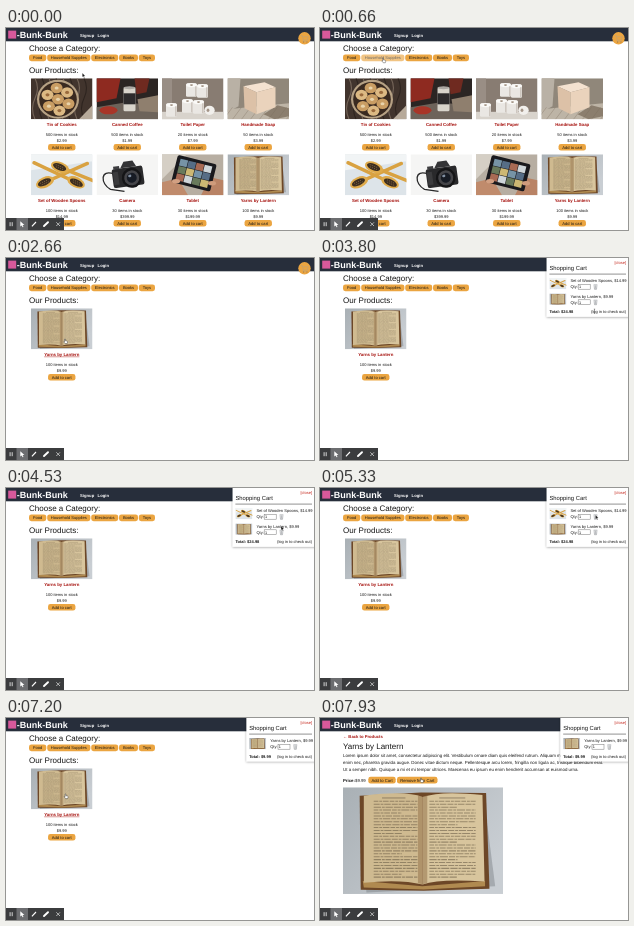
An HTML page that plays this animation: 308x202 px, repeating every 8 s.

```html
<!DOCTYPE html>
<html lang="en">
<head>
<meta charset="utf-8">
<title>Shop demo</title>
<style>
html, body { margin: 0; width: 100%; height: 100%; overflow: hidden; background: #fff; }
body > svg { display: block; width: 100vw; height: 100vh; }
text { font-family: "Liberation Sans", Arial, sans-serif; text-rendering: geometricPrecision; white-space: pre; }
</style>
</head>
<body>
<svg id="stage" viewBox="0 0 308 202"></svg>
<script>
const ORANGE = '#eba541', RED = '#a5100c', INK = '#161616';
const LOOP = 8000, W = 61.5, H = 41;
const BOOK_TITLE = 'Yarns by Lantern';

const rect = (x, y, w, h, fill, extra = '') =>
  `<rect x="${x}" y="${y}" width="${w}" height="${h}" fill="${fill}" ${extra}/>`;
const oval = (x, y, rx, ry, fill, extra = '') =>
  `<ellipse cx="${x}" cy="${y}" rx="${rx}" ry="${ry}" fill="${fill}" ${extra}/>`;
const shape = (d, fill, extra = '') => `<path d="${d}" fill="${fill}" ${extra}/>`;
const line = (d, color, width, extra = '') => shape(d, 'none', `stroke="${color}" stroke-width="${width}" ${extra}`);
const text = (x, y, size, str, { fill = INK, bold, anchor = 'start', extra = '' } = {}) =>
  `<text x="${x}" y="${y}" font-size="${size}" fill="${fill}" text-anchor="${anchor}" ${bold ? 'font-weight="700"' : ''} ${extra}>${str}</text>`;
const group = (id, content) => `<g id="${id}">${content}</g>`;
const turned = (x, y, angle, content) => `<g transform="translate(${x} ${y}) rotate(${angle})">${content}</g>`;
const button = (x, y, w, h, label, size = 4.05) =>
  rect(x, y, w, h, ORANGE, 'rx="2.4"') + text(x + w / 2, y + h / 2 + 1.4, size, label, { anchor: 'middle' });

// Pictures share a 61.5 x 41 drawing area.
function cookies() {
  let s = rect(0, 0, W, H, '#41342d');
  for (let i = 0; i < 9; i++) s += line(`M${i * 7 - 3} 0q5 10 0 20t0 21`, i % 2 ? '#8a7a6c' : '#261d19', 1.1, 'opacity=".7"');
  s += shape('M48 41L61.5 27V41Z', '#b7aa9a') + oval(27, 21, 21, 19.5, '#b6a184') + oval(27, 21, 18.8, 17.4, '#3a2a20');
  for (let i = 0; i < 7; i++) {
    const a = i * Math.PI / 3 + .4, r = i < 6 ? 11.4 : 0;
    const x = 27 + r * Math.cos(a), y = 21 + r * Math.sin(a);
    s += oval(x, y, 6, 5.2, i % 2 ? '#dcb983' : '#c99d63') + oval(x, y, 2, 1.6, i % 2 ? '#9a6a3d' : '#e8d3ab');
  }
  return s;
}

function coffee() {
  return rect(0, 0, W, H, '#2b2523') + shape('M0 0H24L20 20 0 24Z', '#8e2a20') + shape('M38 0H53L50 14 40 16Z', '#6f2a20') +
    shape('M0 29L30 24 61.5 28V41H0Z', '#6d635a') + shape('M41 21L61.5 17V34L43 33Z', '#8f7f6e') + rect(27, 9, 12, 24, '#d8d4cb', 'rx="1.5"') +
    rect(27, 15, 12, 11, '#2d2b2c') + oval(33, 9.5, 6, 1.5, '#aaa7a2') + oval(12, 32, 9, 4, '#a83528');
}

function toiletPaper() {
  const roll = (x, y) => rect(x, y, 11, 13.5, '#eae7e3', 'rx="1.5"') + oval(x + 5.5, y + 1.8, 5.4, 2.1, '#faf9f7') +
    oval(x + 5.5, y + 1.8, 1.6, .8, '#9d8d7e') + rect(x + 9, y + 3, 1.6, 10, '#cdc6bf');
  return rect(0, 0, W, H, '#887c72') + rect(0, 0, 10, 34, '#998e85') + rect(0, 33.5, W, 7.5, '#d8d3cc') +
    roll(24, 5) + roll(35, 6) + roll(20, 21) + roll(31, 22) + roll(4, 25) + oval(47.5, 32, 5.2, 4.6, '#f1efec') +
    oval(46, 32, 1.4, 1.7, '#a49588');
}

function soap() {
  let s = rect(0, 0, W, H, '#90877a') + shape('M0 0H13L11 28 0 34Z', '#b9b1a5') + shape('M0 31L61.5 25V41H0Z', '#bdb4a6');
  for (let i = 0; i < 8; i++) s += line(`M${i * 9 - 4} 41l9 -12`, '#8d8172', .8, 'opacity=".6"');
  return s + shape('M36 36L50 27 61.5 30V38L47 41Z', '#776857', 'opacity=".7"') + shape('M16 8L37 4 48 9 29 14Z', '#f4e2d0') +
    shape('M16 8L29 14V36L17 30Z', '#dcc1a7') + shape('M29 14L48 9V29L29 36Z', '#ead3bc');
}

function spoons() {
  const spoon = (x, y, angle) => turned(x, y, angle, rect(0, -1.7, 48, 3.4, '#d9a241', 'rx="1.5"') +
    oval(0, 0, 9.5, 5.3, '#dfab4b') + oval(-.5, -.2, 7, 3.2, '#3c2e20') +
    line('M-5 -1h9M-4 1h8', '#8a6b45', .8, 'stroke-dasharray="1 1.2"'));
  return rect(0, 0, W, H, '#dde4e9') + shape('M0 0H61.5V7L0 16Z', '#f1f4f5') + spoon(45, 28, 205) + spoon(14, 28, -24) +
    spoon(29, 13, 22);
}

function camera() {
  return rect(0, 0, W, H, '#f5f5f4') + line('M18 20C3 14 4 30 14 35T28 37', '#29292a', 1.3) +
    turned(32, 22, -8, rect(-16, -9, 31, 19, '#29292b', 'rx="2.5"') + shape('M-7 -9L-3 -15H6L9 -9Z', '#343436') +
      rect(-14, -11.5, 6, 3, '#3e3e40') + rect(-15, -6, 5, 13, '#3b3b3d') + oval(3, 2, 10, 10, '#151517') +
      oval(3, 2, 7.5, 7.5, '#454549') + oval(3, 2, 5, 5, '#171b24') + oval(1.3, -.2, 1.6, 1.3, '#8290a2'));
}

function tablet() {
  const tones = ['#7693a6', '#cdb873', '#697a5c', '#ced5d9', '#a86a54', '#566d86'];
  let screen = rect(-20, -14, 40, 28, '#19191d', 'rx="2"');
  for (let i = 0; i < 12; i++)
    screen += rect(-16.5 + i % 4 * 8.3, -11 + Math.floor(i / 4) * 7.5, 7.8, 7, tones[i * 5 % 6]);
  return rect(0, 0, W, H, '#b7aea2') + shape('M0 0H25L0 25Z', '#d5cfc5') + shape('M0 41V28L16 24 26 41Z', '#c08b6c') +
    shape('M61.5 41V26L48 23 39 41Z', '#b98365') + turned(32, 19, 14, screen) + oval(14, 27, 4, 2.2, '#d2a082') + oval(50, 29, 4, 2.2, '#cf9c7c');
}

function book() {
  let s = rect(0, 0, W, H, 'url(#wall)') + shape('M6.5 5L54 3 58.5 38 9 40.4Z', '#6f7478', 'opacity=".4"') +
    shape('M6.4 3.2L30 2 55 2.2 56.3 39 31 39.8 6.8 39.4Z', '#6d4727') + shape('M7.6 36L30.5 38 54.6 36V38L31 39.3 8 38.5Z', '#b08a50') +
    shape('M8 3.2Q24 1.2 30.6 3.7V37.4Q22 35.2 8 36.7Z', '#cfba90') + shape('M30.6 3.7Q38 1.2 53.6 3L54.4 36.2Q37 35 30.6 37.4Z', '#d8c59d') +
    shape('M28.8 3.1L30.6 3.7 32.4 3V36.7L30.6 37.4 28.8 36.8Z', '#8f6f46', 'opacity=".5"');
  for (let i = 0; i < 27; i++) {
    const y = 5.4 + i * 1.12, ends = i % 7 === 4 ? 6 : 0;
    const words = `stroke-dasharray="${1.8 + i % 3 * .5} .35 1.1 .3 ${2.2 + i % 4 * .3} .4" opacity=".6"`;
    s += line(`M11.8 ${y}H${28.6 - ends}M33.2 ${y}H${51 - (i % 6 === 2 ? 7 : 0)}`, '#6d5f49', .4, words);
  }
  return s + line('M15 4.1H24M37 4.1H47', '#6d5f49', .35, 'opacity=".7"');
}

const art = { cookies, coffee, toiletPaper, soap, spoons, camera, tablet, book };
const picture = (name, x, y, w) =>
  `<svg x="${x}" y="${y}" width="${w}" height="${w * H / W}" viewBox="0 0 ${W} ${H}">${art[name]()}</svg>`;

const products = [
  ['cookies', 'Tin of Cookies', 500, '2.99'], ['coffee', 'Canned Coffee', 500, '1.99'],
  ['toiletPaper', 'Toilet Paper', 20, '7.99'], ['soap', 'Handmade Soap', 50, '3.99'],
  ['spoons', 'Set of Wooden Spoons', 100, '14.99'], ['camera', 'Camera', 30, '399.99'],
  ['tablet', 'Tablet', 30, '199.99'], ['book', BOOK_TITLE, 100, '9.99']
];

function card([name, title, stock, price], i) {
  const x = 25 + i % 4 * 65.5, y = 50.3 + Math.floor(i / 4) * 76, mid = x + W / 2, center = { anchor: 'middle' };
  return picture(name, x, y, W) +
    text(mid, y + 47.4, 4.35, title, { fill: RED, bold: true, anchor: 'middle', extra: 'class="title"' }) +
    text(mid, y + 58.1, 4, `${stock} items in stock`, center) + text(mid, y + 63.9, 4, `$${price}`, center) +
    button(mid - 13.7, y + 65.7, 27.4, 6.6, 'Add to cart', 4.1);
}

const page = `<defs><linearGradient id="wall" x2="1" y2=".6"><stop stop-color="#a9b0b5"/><stop offset="1" stop-color="#c9ced3"/></linearGradient>
  <filter id="soft" x="-10%" y="-10%" width="120%" height="130%"><feDropShadow dx="0" dy=".5" stdDeviation="1" flood-opacity=".4"/></filter></defs>` +
  rect(0, 0, 308, 202, '#fff') + rect(0, 0, 308, 13.3, '#272e3b') + rect(2.2, 2.6, 8, 8, '#d8599b') +
  text(10.8, 10.2, 9, '-Bunk-Bunk', { fill: '#fff', bold: true }) +
  text(74, 8.6, 4.2, 'Signup', { fill: '#fff', bold: true }) + text(91.6, 8.6, 4.2, 'Login', { fill: '#fff', bold: true });

const categories = [[23, 17.3, 'Food'], [41.2, 43.2, 'Household Supplies'], [85.2, 27, 'Electronics'], [113, 19, 'Books'], [132.8, 16.2, 'Toys']];
const shop = text(23, 23, 8, 'Choose a Category:') + text(23, 45, 8, 'Our Products:') +
  categories.map(([x, w, label]) => `<g class="category">${button(x, 26.4, w, 6.8, label)}</g>`).join('');

const prose = [
  'Lorem ipsum dolor sit amet, consectetur adipiscing elit. Vestibulum ornare diam quis eleifend rutrum. Aliquam mi',
  'enim nec, pharetra gravida augue. Donec vitae dictum neque. Pellentesque arcu lorem, fringilla non ligula ac, tristique bibendum erat.',
  'Ut a semper nibh. Quisque a mi et mi tempor ultrices. Maecenas eu ipsum eu enim hendrerit accumsan at euismod urna.'
];
const detail = text(23, 20.4, 4.2, '← Back to Products', { fill: RED, bold: true }) + text(23, 31, 8, BOOK_TITLE) +
  prose.map((row, i) => text(23, 39.3 + i * 6.6, 4.42, row)).join('') +
  text(23, 63.5, 4.3, 'Price:', { bold: true }) + text(35, 63.5, 4.3, '$9.99') +
  button(48.3, 58.8, 27.4, 6.8, 'Add to Cart', 4.2) + button(77, 58.8, 40.5, 6.8, 'Remove from Cart', 4.2) +
  picture('book', 23, 69.3, 160);

const cartIcon = oval(298.5, 10.3, 6.2, 6.2, ORANGE) +
  line('M294.8 7.5h1.4l1.2 4.5h4l.8-3.3h-5.3M297.4 12l-.4 1.2h4.4', '#bda27a', .6) +
  oval(297.6, 14, .5, .5, '#8d6a3c') + oval(301, 14, .5, .5, '#8d6a3c');

function cart(left, items, total) {
  const x = left + 2.8, bottom = 24 + 15.4 * items.length;
  let s = rect(left, -2, 312 - left, bottom + 6, '#fff', 'filter="url(#soft)"') +
    text(306, 6.4, 4, '[close]', { fill: '#c4271d', anchor: 'end' }) + text(x, 12.2, 5.85, 'Shopping Cart') +
    line(`M${x} 16.1H306`, '#222', .5);
  items.forEach(([name, label], i) => {
    const y = 20 + i * 15.4, tx = left + 23.8, bin = left + 47;
    s += picture(name, x, y, 17) + text(tx, y + 4.2, 4.05, label) + text(tx, y + 10.3, 4.05, 'Qty:') +
      rect(tx + 7.8, y + 6.4, 12, 4.8, '#fff', 'stroke="#777" stroke-width=".5"') + text(tx + 8.6, y + 10.2, 3.8, '1') +
      line(`M${bin} ${y + 6.8}h3.8M${bin + .5} ${y + 7.3}l.4 4h2l.4 -4M${bin + 1.9} ${y + 7.4}v3.4`, '#85898d', .55);
  });
  return s + text(x, bottom + .4, 4, `Total: ${total}`, { bold: true }) +
    text(306, bottom + .4, 4, '(log in to check out)', { anchor: 'end' });
}
const bookLine = ['book', `${BOOK_TITLE}, $9.99`];

const toolbar = rect(0, 190, 58, 12, '#3b3c3e') + rect(10.5, 190, 11.5, 12, '#6c6d70') +
  line('M4.1 194.2v4M6.2 194.2v4', '#e6e6e6', .9) + shape('M14.3 193.2v5.4l1.4-1.2.9 1.9.9-.4-.9-1.9h1.8Z', '#fff') +
  line('M25.9 198.3L30 194', '#fff', 1.1) + line('M38 198L42 194.2', '#fff', 1.9, 'stroke-linecap="round"') +
  line('M50.3 194.3l3.7 3.7m0-3.7l-3.7 3.7', '#e6e6e6', .7);

const pointers = {
  arrow: shape('M0 0V4.1L1 3.2 1.7 4.7 2.4 4.4 1.7 2.9H2.9Z', '#111', 'stroke="#fff" stroke-width=".25"'),
  hand: shape('M-.4 0q.4-.5 .8 0V1.7l1.7.4q.6.2.5.9L2.2 4.6H.2L-1.4 2.8q0-.7 1-.1Z', '#fff', 'stroke="#222" stroke-width=".4"'),
  beam: line('M-.7 -2.2H.7M0 -2.2V2.2M-.7 2.2H.7', '#222', .4)
};

const stage = document.getElementById('stage');
stage.innerHTML = page + group('shop', shop) + group('all', products.map(card).join('')) +
  group('household', products.slice(2, 5).map(card).join('')) + group('books', card(products[7], 0)) +
  group('detail', detail) + group('icon', cartIcon) +
  group('pair', cart(226.6, [['spoons', 'Set of Wooden Spoons, $14.99'], bookLine], '$24.98')) +
  group('single', cart(240.4, [bookLine], '$9.99')) + toolbar +
  group('cursor', Object.entries(pointers).map(([id, mark]) => group(id, mark)).join(''));

const el = id => document.getElementById(id);
const visible = {
  shop: [0, 7450], all: [0, 1050], household: [1050, 1750], books: [1750, 7450], detail: [7450, LOOP],
  icon: [0, 3600], pair: [3600, 5530], single: [5530, LOOP]
};
// time, x, y
const path = [
  [0, 76.3, 45], [60, 76.3, 45], [700, 63, 30], [1120, 63, 30], [1480, 118, 28], [1770, 118, 28], [2400, 59, 81],
  [2680, 59, 81], [2980, 58, 118], [3200, 58, 118], [3530, 298, 10], [3610, 298, 10], [3780, 274.5, 53.3],
  [4200, 274.5, 53.3], [4800, 275.5, 27], [5600, 275.5, 27], [6700, 59.5, 76], [7480, 59.5, 76], [7850, 101, 60], [LOOP, 101, 60]
];

function cursorAt(t) {
  const i = path.findIndex(p => p[0] > t);
  const [t0, x0, y0] = path[i - 1], [t1, x1, y1] = path[i];
  const k = (t - t0) / (t1 - t0), e = k * k * (3 - 2 * k);
  return [x0 + (x1 - x0) * e, y0 + (y1 - y0) * e];
}

const inside = (x, y, x0, y0, x1, y1) => x >= x0 && x <= x1 && y >= y0 && y <= y1;
const show = (id, on) => el(id).setAttribute('display', on ? 'inline' : 'none');
const bookTitle = document.querySelector('#books .title');
const categoryButtons = document.querySelectorAll('.category');

function pointerKind(t, x, y, onLink) {
  if (t > 3650 && t < 4260 && inside(x, y, 270, 50, 306, 56)) return 'beam';
  const onButton = t < 7450 ? t > 1750 && inside(x, y, 42, 116, 70, 123) : inside(x, y, 48, 58, 118, 66);
  return onLink || onButton || (t < 3600 && inside(x, y, 292, 4, 305, 17)) ? 'hand' : 'arrow';
}

function draw(t) {
  for (const id in visible) show(id, t >= visible[id][0] && t < visible[id][1]);
  const [x, y] = cursorAt(t);
  const onBook = t >= 1750 && t < 7450 && inside(x, y, 25, 50, 87, 99);
  bookTitle.setAttribute('text-decoration', onBook ? 'underline' : 'none');
  const hovered = categories.findIndex(([left, w]) => inside(x, y, left, 26, left + w, 33.5));
  categoryButtons.forEach((b, i) => b.setAttribute('opacity', i === hovered ? .65 : 1));
  const kind = pointerKind(t, x, y, onBook || (t < 7450 && hovered >= 0));
  for (const id in pointers) show(id, id === kind);
  el('cursor').setAttribute('transform', `translate(${x} ${y})`);
}

const start = performance.now();
function tick() {
  draw((performance.now() - start) % LOOP);
  requestAnimationFrame(tick);
}
tick();
</script>
</body>
</html>
```
